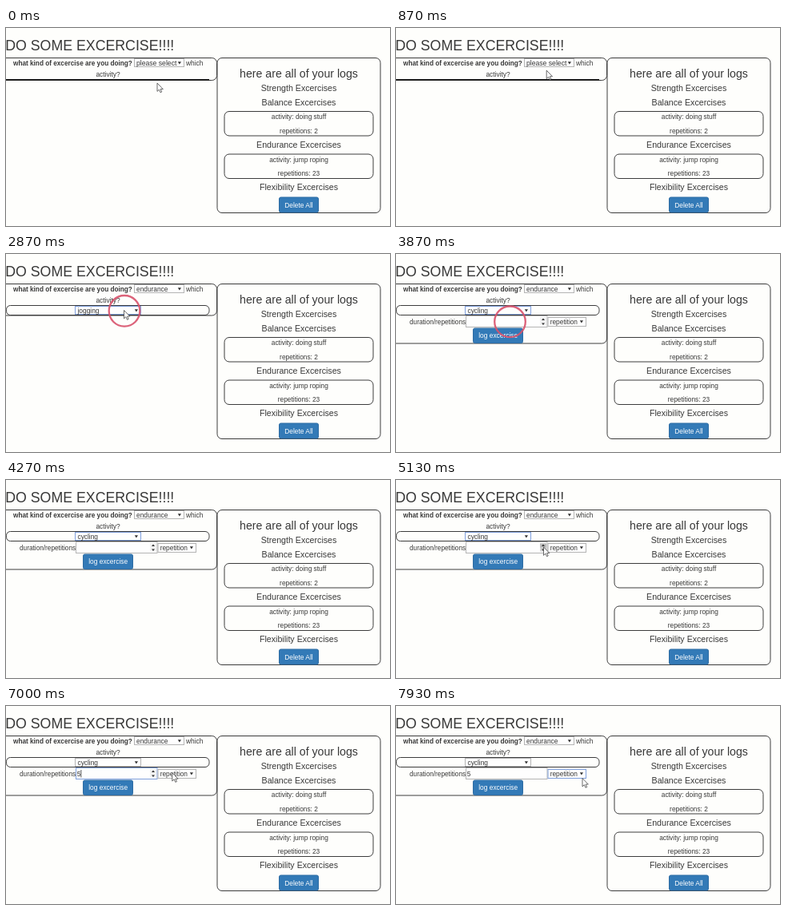
Animation of 480x248 px, one loop 8 s. Source, as an HTML page:

```html
<!DOCTYPE html>
<html lang="en">
<head>
<meta charset="utf-8">
<title>Exercise log</title>
<style>
  html, body { margin: 0; width: 100%; height: 100%; overflow: hidden; background: #fefefc; }
  svg { display: block; width: 480px; height: 248px; }
  text { font: 8.35px "Liberation Sans", Arial, sans-serif; fill: #383838; white-space: pre; }
  .mid { text-anchor: middle; }
  .h1 { font-size: 17.75px; }
  .h2 { font-size: 14.15px; }
  .h4 { font-size: 10.65px; }
  .bold { font-size: 8.23px; font-weight: bold; }
  .btn rect { fill: #337ab7; stroke: #2e6da4; }
  .btn text { fill: #fff; font-size: 8.4px; }
  .box { fill: none; stroke: #3c3c3c; }
  .field rect { fill: #fefefe; stroke: #b4b4b4; }
  .field.focus > rect { stroke: #7f9fdc; }
  .field path { fill: #333; }
  .field #spinner rect { stroke: none; }
</style>
</head>
<body>
<svg viewBox="0 0 480 248">
  <text class="h1" x="-.8" y="27.5">DO SOME EXCERCISE!!!!</text>

  <rect class="box" id="panel" x="-10" y="37.5" width="273.5" height="28" rx="6"/>
  <text class="bold" x="9" y="46.5">what kind of excercise are you doing?</text>
  <text x="225" y="46.5">which</text>
  <text class="mid" x="127.5" y="61">activity?</text>
  <path id="line" d="M0 64.7H254" stroke="#111" stroke-width="1.6"/>

  <g id="kind" class="field">
    <rect x="160.5" y="38.5" width="62" height="10"/>
    <text id="kindText" x="163" y="46.5"></text>
    <path d="M214.8 42.2h4.2l-2.1 3.2z"/>
  </g>

  <g id="activityRow">
    <rect class="box" x=".5" y="64.5" width="253.5" height="12" rx="5"/>
    <g id="activity" class="field">
      <rect x="86.5" y="65.5" width="82" height="10"/>
      <text id="activityText" x="89.5" y="73.5"></text>
      <path d="M160.8 69.2h4.2l-2.1 3.2z"/>
    </g>
  </g>

  <g id="amountRow">
    <text x="17" y="87.8" style="font-size:8.25px">duration/repetitions</text>
    <g id="amount" class="field">
      <rect x="87.5" y="77.5" width="101.5" height="14"/>
      <text id="amountText" x="88.7" y="87.8"></text>
      <path id="caret" d="M93.5 80h.8v9.5h-.8z"/>
      <g id="spinner">
        <rect id="spinBack" x="180" y="79.5" width="8" height="10"/>
        <rect id="spinUp" x="180" y="79.5" width="8" height="5"/>
        <path d="M182 83h4l-2-2.6zM182 86.5h4l-2 2.6z"/>
      </g>
    </g>
    <g id="unit" class="field">
      <rect x="190" y="79.5" width="47.5" height="11"/>
      <text x="192.7" y="87.8">repetition</text>
      <path d="M229.8 83.2h4.2l-2.1 3.2z"/>
    </g>
    <g class="btn">
      <rect x="96.5" y="93" width="62" height="18.5" rx="2"/>
      <text class="mid" x="127.7" y="105.2">log excercise</text>
    </g>
  </g>

  <rect class="box" x="264" y="37.5" width="204" height="194" rx="6"/>
  <text class="h2 mid" x="366" y="62">here are all of your logs</text>
  <g class="mid">
    <text class="h4" x="366" y="79.3">Strength Excercises</text>
    <text class="h4" x="366" y="96.5">Balance Excercises</text>
    <text class="h4" x="366" y="150">Endurance Excercises</text>
    <text class="h4" x="366" y="203.3">Flexibility Excercises</text>
    <rect class="box" x="273" y="104.5" width="186" height="30.5" rx="6"/>
    <text x="366" y="114">activity: doing stuff</text>
    <text x="366" y="131.5">repetitions: 2</text>
    <rect class="box" x="273" y="158" width="186" height="30.5" rx="6"/>
    <text x="366" y="167.5">activity: jump roping</text>
    <text x="366" y="185">repetitions: 23</text>
  </g>
  <g class="btn">
    <rect x="341.5" y="212" width="49" height="19" rx="2"/>
    <text class="mid" x="366" y="224.6">Delete All</text>
  </g>

  <path id="cursor" d="M0 0V10.4L2.4 8.2L4 11.8L5.7 11L4.1 7.6H7.3Z" fill="#fff" stroke="#444" stroke-width=".8"/>
  <circle id="ring" r="19.3" fill="none" stroke="#d9536c" stroke-width="2.3"/>
</svg>

<script>
const LOOP = 8000;
const $ = id => document.getElementById(id);
const show = (id, on) => { $(id).style.display = on ? "" : "none"; };

// [time, x, y] stops of the pointer
const path = [
  [0, 189, 69], [1200, 188, 49.5], [2000, 188, 49.5], [2270, 186, 80],
  [2670, 147.5, 70.5], [2950, 147.5, 70.5], [3400, 142, 84], [4000, 142, 84],
  [4700, 160, 85], [5100, 184.5, 84], [5500, 184, 81.7], [6600, 184, 81.7],
  [7150, 213, 84], [7500, 213, 84], [7850, 233, 90.5], [LOOP, 233, 90.5]
];
const openKind = 1400, pickKind = 2270, openActivity = 2870, pickActivity = 3870, openUnit = 7330;
const steps = [5560, 5760, 5960, 6130, 6430];
const clicks = [openKind, pickKind, openActivity, pickActivity, ...steps, openUnit];

function pointerAt(t) {
  const i = path.findIndex(p => p[0] > t);
  const [t0, x0, y0] = path[i - 1], [t1, x1, y1] = path[i];
  const u = (t - t0) / (t1 - t0), e = u * u * (3 - 2 * u);
  return [x0 + (x1 - x0) * e, y0 + (y1 - y0) * e];
}

function focusAt(t) {
  if (t < openKind) return "";
  if (t < openActivity) return "kind";
  if (t < steps[0]) return "activity";
  return t < openUnit ? "amount" : "unit";
}

function draw(t) {
  const picked = t >= pickKind, logging = t >= pickActivity;
  const focus = focusAt(t);
  const count = steps.filter(s => s <= t).length;
  const age = t - Math.max(-LOOP, ...clicks.filter(c => c <= t));
  const [x, y] = pointerAt(t);

  $("panel").setAttribute("height", logging ? 74.5 : picked ? 39.5 : 28);
  show("line", !picked);
  show("activityRow", picked);
  show("amountRow", logging);
  $("kindText").textContent = picked ? "endurance" : "please select";
  $("kindText").style.fontSize = picked ? "" : "8.65px";
  $("activityText").textContent = logging ? "cycling" : "jogging";
  $("amountText").textContent = count || "";
  for (const id of ["kind", "activity", "amount", "unit"])
    $(id).classList.toggle("focus", id === focus);

  const hover = x > 180 && x < 189;
  show("caret", focus === "amount" && (t - steps[0]) % 1000 < 700);
  show("spinner", focus !== "unit");
  $("spinBack").style.fill = hover ? "#d4d4d4" : "#f3f3f3";
  $("spinUp").style.fill = !hover ? "#f3f3f3" : age < 150 ? "#858585" : "#bcbcbc";

  // The arrow gives way to a text pointer over the number input
  $("cursor").setAttribute("transform", `translate(${x} ${y})`);
  show("cursor", !logging || x > 170);

  $("ring").setAttribute("transform", `translate(${x + .5} ${y + .8})`);
  $("ring").style.opacity = Math.max(0, Math.min(1, (400 - age) / 200)) * .9;
}

const start = performance.now();
function tick() {
  draw((performance.now() - start) % LOOP);
  requestAnimationFrame(tick);
}
tick();
</script>
</body>
</html>
```
